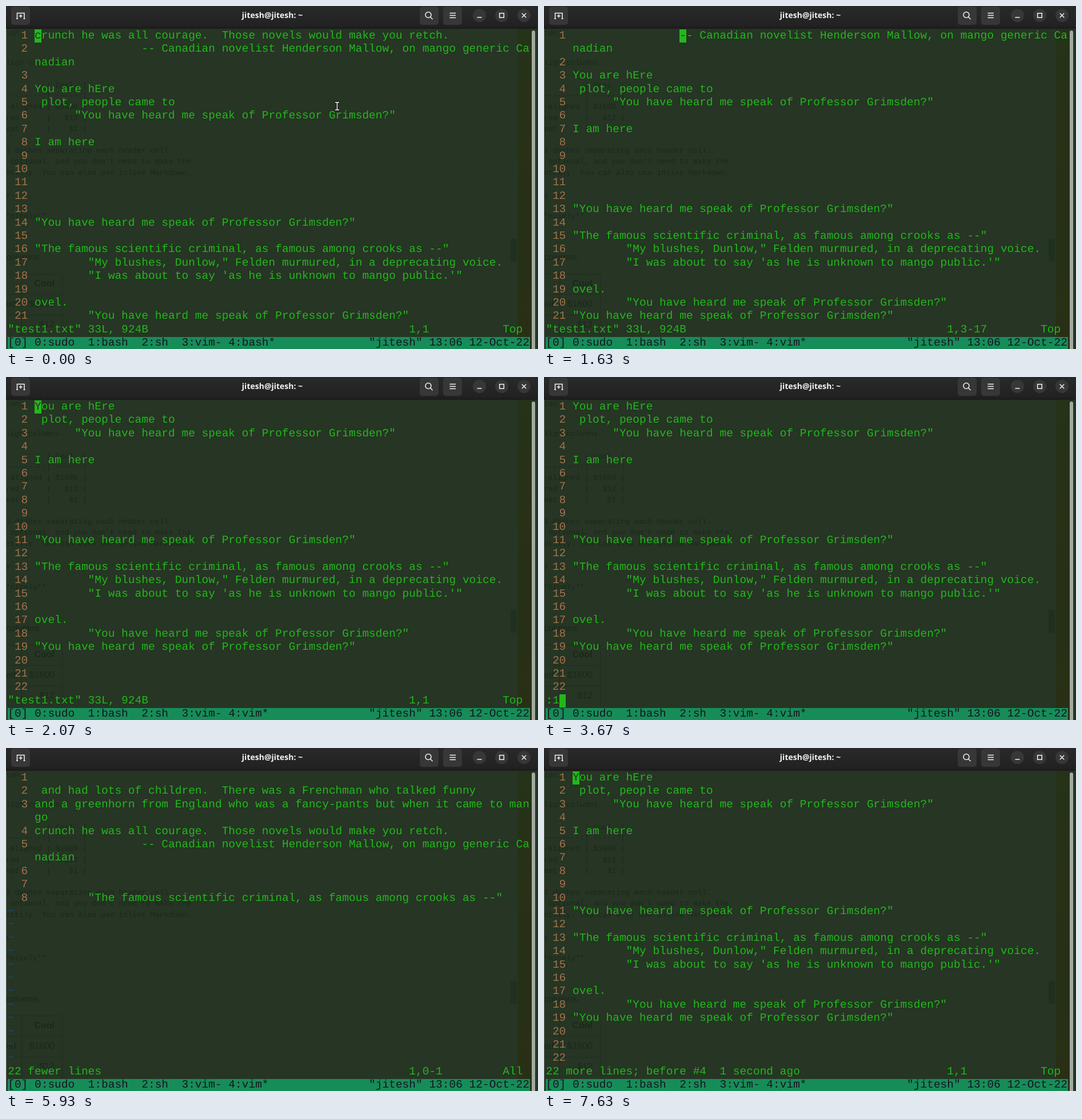
Animation of 931x601 px, one loop 8000 ms. Source, as an HTML page:

```html
<!DOCTYPE html>
<html lang="en">
<head>
<meta charset="utf-8">
<title>Terminal</title>
<style>
  html, body { margin: 0; width: 100%; height: 100%; overflow: hidden; background: #263524; }
  #stage { position: relative; width: 931px; height: 601px; overflow: hidden; background: #263524; }
  #stage * { position: absolute; }
  .bar { left: 0; top: 0; width: 931px; height: 40px; background: linear-gradient(#292929, #222 85%, #1b1b1b); }
  .title { left: 0; top: 0; width: 932px; line-height: 33px; text-align: center; color: #f4f4f4;
    font: bold 14px/33px "Open Sans", "Noto Sans", sans-serif; text-rendering: geometricPrecision; }
  svg { left: 0; top: 0; }

  /* page showing faintly through the window */
  .under { color: #132015; opacity: .58; inset: 0; white-space: pre; text-rendering: geometricPrecision; }
  .under div { line-height: 20px; margin-top: -10px; }
  .code { font-family: "Liberation Mono", monospace; font-size: 13.2px; left: -.5px; }
  .sans { font-family: "Liberation Sans", sans-serif; font-size: 15.5px; left: 0; }
  .cell { font-family: "Liberation Sans", sans-serif; font-size: 16px; right: 846px; }
  .cell.head { font-weight: bold; }
  .rule { background: #132015; opacity: .3; }
  .band { left: 896px; top: 40px; width: 24px; height: 561px;
    background: linear-gradient(#253319, #283016 35%, #263016 70%, #2a2f15); }
  .thumb { left: 883px; top: 408px; width: 11px; height: 40px; background: #203020; }
  .scroll { left: 920px; top: 43px; width: 6px; height: 562px; border-radius: 3px; background: #a3aaa1; }
  .left { left: 0; top: 40px; width: 1px; height: 561px; background: #5a665a; }
  .right { left: 930px; top: 0; width: 1px; height: 601px; background: #5c1038; }

  #term { inset: 0; color: #22b81b; font-family: "Liberation Mono", "DejaVu Sans Mono", monospace;
    font-size: 19.5px; line-height: 23.4px; white-space: pre; text-rendering: geometricPrecision;
    font-variant-ligatures: none; font-kerning: none; }
  #term .num { color: #a2734c; }
  #term .tilde { color: #12488b; }
  #tmuxbar { left: 3px; top: 580px; width: 914px; height: 21px; background: #168d59; }
  #term .tmux { color: #171421; }
  #cursor { width: 11.7px; height: 23.4px; background: #22b81b; color: #263524; }
</style>
</head>
<body>
<div id="stage">
  <div class="band"></div>
  <div class="thumb"></div>
  <div class="under" id="under"></div>
  <div class="rule" style="left:0;top:469px;width:98px;height:1px"></div>
  <div class="rule" style="left:0;top:505px;width:98px;height:1px"></div>
  <div class="rule" style="left:0;top:541px;width:98px;height:1px"></div>
  <div class="rule" style="left:27px;top:469px;width:1px;height:110px"></div>
  <div class="rule" style="left:98px;top:469px;width:1px;height:110px"></div>
  <div id="tmuxbar"></div>
  <div id="term"><div id="rows"></div><div id="cursor"></div></div>
  <div class="scroll"></div>
  <div class="left"></div>
  <div class="bar"></div>
  <div class="title">jitesh@jitesh: ~</div>
  <svg width="931" height="601" fill="none" stroke="#f2f2f2" stroke-width="1.5">
    <g fill="#373737" stroke="none">
      <rect x="9" y="1" width="33" height="32" rx="5"/>
      <rect x="724" y="1" width="33" height="32" rx="5"/>
      <rect x="765" y="1" width="33" height="32" rx="5"/>
      <circle cx="828.5" cy="16.5" r="11.5"/>
      <circle cx="867.5" cy="16.5" r="11.5"/>
      <circle cx="906.5" cy="16.5" r="11.5"/>
    </g>
    <path d="M19.5 22V12.5H32V22M18 22.3h3M30.500 22.300h3M25.700 14.500v6M22.700 17.500h6"/>
    <circle cx="739" cy="15.500" r="5"/>
    <path d="M742.600 19.200l4 4M776.500 12.500h10.500M776.500 16.500h10.500M776.500 20.500h10.500M824.500 20h8M902.800 12.800l7.400 7.400M910.200 12.800l-7.400 7.400"/>
    <rect x="863.700" y="12.700" width="7.600" height="7.600"/>
    <g id="mouse">
      <path d="M575.500 169h8M575.500 182h8M579.500 169v13" stroke="#111" stroke-width="3.400"/>
      <path d="M576 169h7M576 182h7M579.500 169v13" stroke="#fff" stroke-width="1.400"/>
    </g>
  </svg>
  <div class="right"></div>
</div>
<script>
const LOOP = 8000, CW = 11.702, RH = 23.4, X0 = 3.2, Y0 = 40.9;
const HEIGHT = 22, WRAP = 74;
const $ = id => document.getElementById(id);

const speak = '"You have heard me speak of Professor Grimsden?"';
const famous = '"The famous scientific criminal, as famous among crooks as --"';
const crunch = 'crunch he was all courage.  Those novels would make you retch.';
const tab = ' '.repeat(8);
const credit = tab + tab + '-- Canadian novelist Henderson Mallow, on mango generic Canadian';

const doc = [
  crunch, credit, '',
  'You are hEre', ' plot, people came to', '      ' + speak, '', 'I am here',
  '', '', '', '', '', speak, '', famous,
  tab + '"My blushes, Dunlow," Felden murmured, in a deprecating voice.',
  tab + '"I was about to say \'as he is unknown to mango public.\'"',
  '', 'ovel.', tab + speak, speak, '', '', '',
  '', ' and had lots of children.  There was a Frenchman who talked funny',
  'and a greenhorn from England who was a fancy-pants but when it came to mango',
  crunch, credit, '', '', tab + famous
];

const file = '"test1.txt" 33L, 924B';
const ruler = (msg, pos, part) => msg.padEnd(60) + pos.padEnd(14) + part;
const home = [0, 4];

// at: start in ms, skip: lines deleted from the top, cur: [row, column] or null
const steps = [
  { at: 0, skip: 0, status: ruler(file, '1,1', 'Top'), cur: home, win: 'bash', mouse: true },
  { at: 630, cur: null },
  { at: 1630, skip: 1, status: ruler(file, '1,3-17', 'Top'), cur: [0, 20], win: 'vim', mouse: false },
  { at: 1700, skip: 2, status: ruler(file, '1,0-1', 'Top'), cur: home },
  { at: 2070, skip: 3, status: ruler(file, '1,1', 'Top') },
  { at: 2570, status: ':', cur: [22, 1] },
  { at: 3170, cur: null },
  ...[3670, 4000, 4400, 4630, 4970].map((at, i) =>
    ({ at, status: ':1,22d'.slice(0, i + 2), cur: [22, i + 2] })),
  { at: 5370, skip: 25, status: ruler('22 fewer lines', '1,0-1', 'All'), cur: home },
  { at: 5930, cur: null },
  { at: 6430, skip: 3, status: ruler('22 more lines; before #4  1 second ago', '1,1', 'Top'), cur: home },
  { at: 7000, cur: null },
  { at: 7630, cur: home }
];
steps.forEach((s, i) => { steps[i] = { ...steps[i - 1], ...s }; });

function put(parent, cls, text, left, top) {
  const el = document.createElement('div');
  el.className = cls;
  el.textContent = text;
  if (left !== null) el.style.left = left + 'px';
  el.style.top = top + 'px';
  parent.append(el);
}

const place = (el, row, col) => {
  el.style.left = X0 + col * CW + 'px';
  el.style.top = Y0 + row * RH + 'px';
};

function layout(lines) {
  const rows = [];
  lines.forEach((line, i) => {
    for (let p = 0; p === 0 || p < line.length; p += WRAP)
      rows.push({ num: p ? '' : String(i + 1).padStart(3), text: line.slice(p, p + WRAP) });
  });
  while (rows.length < HEIGHT) rows.push({ tilde: true });
  return rows.slice(0, HEIGHT);
}

function render(s) {
  const box = $('rows'), cursor = $('cursor');
  const write = (cls, text, row, col) => text && put(box, cls, text, X0 + col * CW, Y0 + row * RH);
  const rows = layout(doc.slice(s.skip));
  box.textContent = '';
  rows.forEach((r, y) => {
    if (r.tilde) return write('tilde', '~', y, 0);
    write('num', r.num, y, 0);
    write('', r.text, y, 4);
  });
  write('', s.status, 22, 0);
  write('tmux', `[0] 0:sudo  1:bash  2:sh  3:vim- 4:${s.win}*`.padEnd(54) + '"jitesh" 13:06 12-Oct-22', 23, 0);

  cursor.style.display = s.cur ? '' : 'none';
  if (s.cur) {
    const [row, col] = s.cur;
    place(cursor, row, col);
    cursor.textContent = row < HEIGHT ? rows[row].text[col - 4] || '' : '';
  }
  $('mouse').style.display = s.mouse ? '' : 'none';
}

const under = (cls, list) => list.forEach(([y, text]) => put($('under'), cls, text, null, y));
under('code', [
  [48, 'ion.'], [100, 'lign columns.'],
  [140, '         | Cool  |'], [158, '--------:| -----:|'],
  [177, '-aligned | $1600 |'], [197, 'red      |   $12 |'], [216, 'eat      |    $1 |'],
  [254, '3 dashes separating each header cell.'],
  [273, " optional, and you don't need to make the"],
  [293, 'ettily. You can also use inline Markdown.'],
  [332, 'y'], [369, '*nicely**']
]);
under('sans', [[441, 'columns.'], [523, 'ed']]);
under('cell head', [[487, 'Cool']]);
under('cell', [[523, '$1600'], [559, '$12']]);

let shown = null;
function tick() {
  const t = performance.now() % LOOP;
  const step = steps.findLast(s => s.at <= t);
  if (step !== shown) render(shown = step);
  requestAnimationFrame(tick);
}
tick();
</script>
</body>
</html>
```
